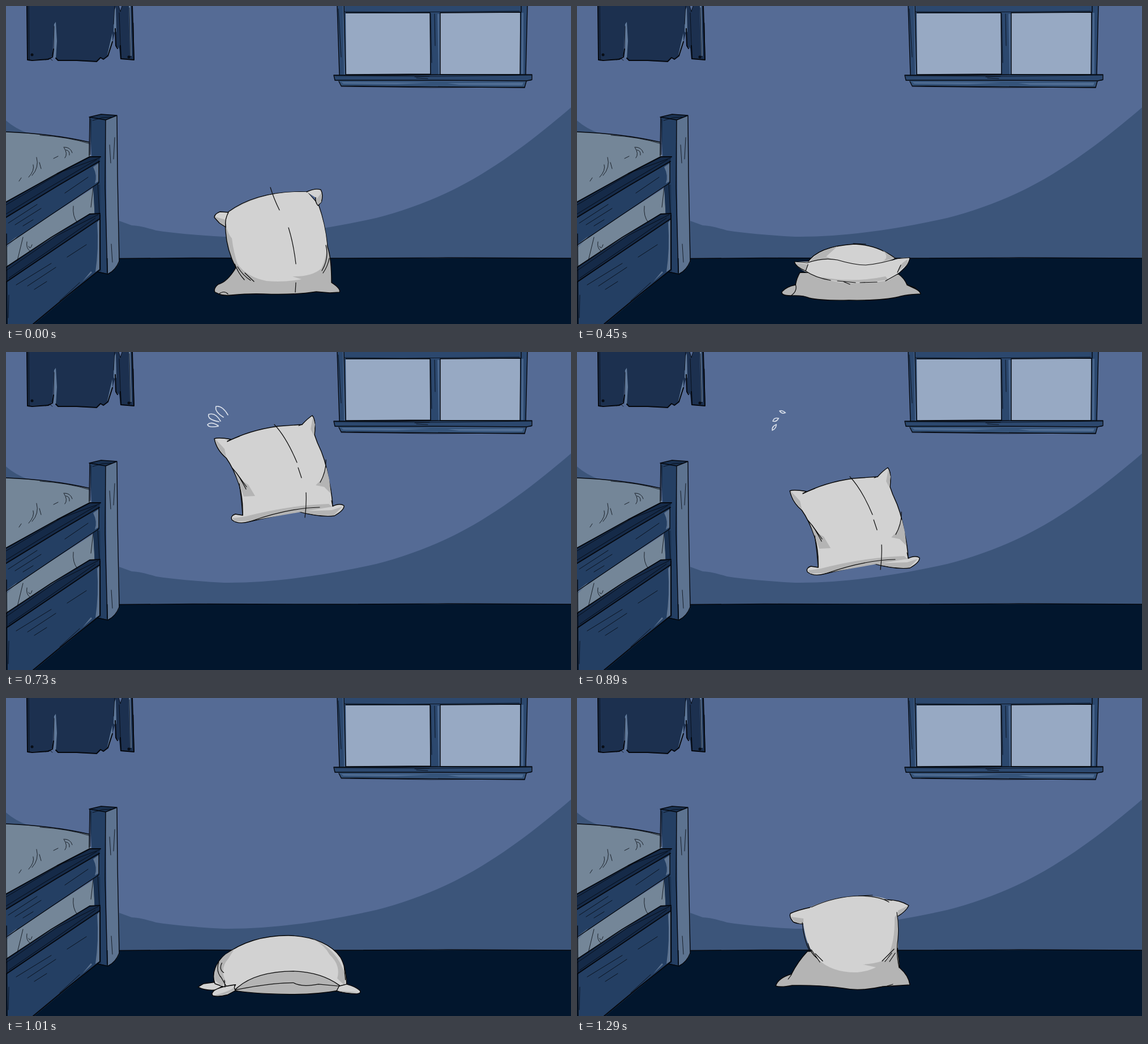
These frames come from a looping animation (998x561 px, 2.04 s). An HTML page:

```html
<!DOCTYPE html>
<html lang="en">
<head>
<meta charset="utf-8">
<title>Pillow hop</title>
<style>
html, body { margin: 0; width: 100%; height: 100%; overflow: hidden; background: #02162d; }
svg { display: block; width: 100%; height: 100%; }
.ink, .ink path { fill: none; stroke: #05080e; stroke-width: 1.4; stroke-linecap: round; stroke-linejoin: round; }
.ink .thin { stroke-width: .8; }
.ink .bold { stroke-width: 2; }
#pillow path { vector-effect: non-scaling-stroke; stroke-linecap: round; stroke-linejoin: round; }
.light { fill: #d2d2d2; }
.grey { fill: #b4b4b4; }
.edge { stroke: #080808; stroke-width: 1.4; }
.line { fill: none; stroke: #0c0c0c; stroke-width: 1.2; }
.flick { fill: none; stroke: #dde3ec; stroke-width: 1.6; stroke-linecap: round; }
</style>
</head>
<body>
<svg viewBox="0 0 998 561" preserveAspectRatio="none">
  <!-- wall and floor -->
  <path fill="#556b95" d="M0 0H998V446H0Z"/>
  <path fill="#3c557a" d="M998 179C940 229 870 283 800 319C750 345 690 366 640 377C560 394 470 408 385 407Q310 403 265 396Q235 387 222 387L200 379V446H998ZM0 202Q16 216 38 224H0Z"/>
  <path fill="#02162d" d="M0 445H998V561H0Z"/>
  <path class="ink" d="M200 445.500L330 444.500L600 445L780 444L998 445"/>

  <!-- torn poster -->
  <path fill="#1c304f" d="M37 0L38 95L75 94L82 88L85 32L89 60L88 93L92 96L160 98L167 91L172 94L180 88L188 63L193 45L194 70L200 75L202 94L226 95L223 0Z"/>
  <path fill="#60799a" d="M85 32L88 28L90 62L88 92L85 92ZM191 8L194 2L195 45L193 48L190 45ZM217 0L220 0L222 88L219 88ZM184 64L188 48L188 66L182 86L179 86Z"/>
  <path fill="#556b95" d="M199 0L202 9L205 0Z"/>
  <g class="ink">
    <path class="bold" d="M37 0L38 95L46 96L75 94L82 90L84 76M88 92L92 96L125 96L160 98L167 91L172 94L180 88L188 63M193 40L194 70L197 75M202 70L203 93L226 95L223 0"/>
    <path class="thin" d="M40 0L41 96M84 76L85 36M192 0L190 32M199 0L202 10L205 0M218 3L220 90M226 93L225 30M200 12L203 92M70 95L77 92L82 96"/>
  </g>
  <g fill="#080d16"><circle cx="46" cy="86" r="2.500"/><circle cx="217" cy="90" r="2.500"/></g>

  <!-- window -->
  <path fill="#2c486e" d="M585 0H921L918 122H589Z"/>
  <path fill="#48658c" d="M595 0H598L600 121H597ZM911 12L914 12L914 120L910 120ZM762 14H766V120H764Z"/>
  <path fill="#97a9c3" d="M600 13L749 12L749 121H601ZM767 12L908 12L908 121H767Z"/>
  <path fill="#2c486e" d="M580 122L929 121L928 132L581 132Z"/>
  <path fill="#355379" d="M588 132L919 133L916 144L592 141Z"/>
  <path fill="#506d93" d="M592 134L750 135L690 138L596 137ZM780 136L914 135L912 140L800 139Z"/>
  <g class="ink">
    <path d="M585 0L589 122M597 0L600 121M600 12L749 12M749 12L750 121M767 12L767 121M767 12L909 11L908 121M910 0V11M921 0L918 121M601 121L750 120M767 121L908 121"/>
    <path d="M579 122L690 122L770 121L929 121L929 130L920 132L760 131L581 131ZM588 133L592 141L700 142L916 144L919 133"/>
    <path class="thin" d="M750 13L752 100M598 10L700 11L907 9M722 125L748 124M725 127L745 128M587 5L592 90M757 14L758 70M581 123L760 124L928 122M592 142L750 144L916 143"/>
  </g>

  <!-- bed -->
  <path fill="#748698" d="M0 222Q80 226 146 240L150 268L0 348ZM0 420L156 320V370L0 464Z"/>
  <path fill="#243f63" d="M148 196L176 201L178 472L162 468L154 320Z"/>
  <path fill="#1a3150" d="M154 315H166L168 468H162ZM147 196L170 191L196 193L176 201Z"/>
  <path fill="#5d7390" d="M176 201L196 194L200 452Q194 466 180 472Z"/>
  <path fill="#152a48" d="M0 345L148 266H167L164 276L0 374ZM0 461L148 366H166V376L0 488Z"/>
  <path fill="#243f63" d="M0 372L164 274V312L0 422ZM2 487L166 374V465L50 561H2Z"/>
  <path fill="#5d7390" d="M164 277V309L157 313Q162 300 154 284ZM166 376V464L158 469Q164 430 161 382ZM152 470L135 486L150 468ZM0 421L20 406L2 426Z"/>
  <g class="ink">
    <path d="M0 222Q80 225 146 240M148 196L147 264M147 196L168 191L196 193L176 201ZM176 201L175 320L179 470M196 194L197 300L200 450Q194 466 180 473L161 469"/>
    <path class="bold" d="M0 346L90 296L148 266L167 266M0 373L90 318L165 274M0 461L80 408L148 367L166 366M0 487L80 433L166 375M166 368L166 465L112 508L48 561"/>
    <path d="M164 274V312M0 422L80 368L164 312M1 402L2 561"/>
    <path class="thin" d="M60 228Q110 231 148 243M153 202L170 197L186 196M0 351L100 292L165 268M0 367L70 324L160 271M0 467L90 405L163 368M5 480L75 432L158 374M154 320L150 355M162 312L165 366M150 200L149 262M183 245L185 277M192 232L190 270M186 420L188 452"/>
    <path class="thin" d="M40 302Q51 290 48 280M46 299Q59 285 54 267M59 276L62 287M23 309L27 303M84 269L92 265M103 249Q114 249 117 259M106 254Q113 255 112 263M102 249Q110 261 104 268M119 353Q117 371 126 382M20 449L30 408M37 416Q35 427 42 432M40 424Q43 431 46 421"/>
    <path class="thin" d="M4 383L55 350M16 386L62 357M30 388L48 377M104 330L145 302M18 492L80 454M38 494L88 461M50 500L72 486M108 443L142 421M5 510L4 550M130 488L95 520"/>
  </g>

  <g id="pillow"></g>
  <path id="flick" class="flick"/>
</svg>
<script>
// Each pose is a stack of [class, path]; later entries lie on top.
const G = "grey edge", L = "light edge", S = "light", D = "grey", I = "line";
const poses = {
  lean: [
    [G, "M406 462C398 475 388 488 375 491C366 498 367 506 372 506Q383 512 398 510Q430 507 455 508Q510 510 548 504L572 506L589 505Q592 499 575 488Q575 445 568 425Q564 385 552 350L532 328Q445 325 393 363Q386 376 388 398Q390 430 406 462Z"],
    [S, "M389 388Q386 376 393 364Q445 330 510 328H532L551 350Q564 385 567 420Q566 445 557 463Q540 478 506 477L522 482Q490 488 460 485Q425 478 409 455Q402 435 399 410Q392 402 389 388Z"],
    [G, "M393 364L378 363Q368 367 368 373L377 383L388 390Q386 376 393 364Z"],
    [S, "M391 365L378 364Q369 367 370 372L387 377Z"],
    [L, "M531 328Q545 321 556 324Q561 333 557 346L551 352Q546 346 547 338"],
    [D, "M557 330L557 346L551 351Q547 345 549 340Z"],
    [I, "M467 320Q473 340 483 360M499 391Q508 420 512 455M512 488L511 505M404 455Q410 471 421 483M409 460Q418 475 432 484M422 471L438 486M565 422Q571 445 558 467M571 445Q568 460 560 471M376 508Q385 501 392 508"]
  ],
  sag: [
    [G, "M407 462Q390 475 380 494Q358 499 357 509Q358 516 385 513Q440 512 500 514Q550 514 586 504Q600 508 616 506Q620 496 610 492L597 485Q585 465 570 450Z"],
    [S, "M388 394Q391 430 408 464L425 474L470 492L508 495L538 491L510 486L548 474L562 463Q573 440 572 410Q572 385 566 364L545 352Q480 345 430 357Q405 365 392 380Z"],
    [D, "M571 415Q570 450 556 466L530 480Q565 458 567 425ZM407 383Q470 381 536 365Q515 384 472 385Q440 386 407 383Z"],
    [L, "M398 373L387 366Q378 362 374 368Q373 380 380 389L389 397Q389 380 398 373Z"],
    [L, "M545 352Q556 338 565 335Q573 338 571 352Q569 364 564 368Q558 357 545 352Z"],
    [D, "M571 343L570 357L565 366L560 358ZM375 369Q384 378 388 394L380 388Z"],
    [I, "M398 373Q430 353 480 349Q515 347 545 352M388 394Q390 432 413 470M564 367Q571 385 572 410Q574 440 560 466M407 383Q470 388 500 380Q525 374 536 365M490 402Q498 430 499 462M502 498L501 513M432 473Q455 488 478 489M440 476Q470 490 504 493M470 478Q485 486 534 491M490 481Q500 484 531 485M374 362L384 364M590 483Q598 484 604 490"]
  ],
  flat: [
    [G, "M394 470Q388 480 386 492Q370 495 362 504Q360 511 378 511Q400 510 410 515Q430 520 480 519Q540 520 568 513Q580 509 607 508Q606 503 598 499L583 492Q578 480 568 473Z"],
    [L, "M407 453Q425 424 490 420Q530 421 562 445Q545 460 500 458Z"],
    [D, "M412 449Q427 432 460 424L440 442L452 447ZM540 431L561 445L535 452Q555 446 540 431Z"],
    [S, "M384 451Q390 465 410 471Q430 483 470 488Q520 490 550 484Q572 470 584 455L588 444Q575 443 560 448Q530 457 500 457Q450 440 412 451Z"],
    [D, "M386 453L407 456L403 467Q390 462 386 453ZM584 447L584 455L566 469Q568 456 584 447ZM430 478Q490 489 545 477L550 483Q490 492 440 482Z"],
    [I, "M403 467Q386 460 384 451L407 453Q435 443 460 448Q490 457 510 457Q540 454 562 446L588 444Q586 459 568 472L545 485M404 467L408 456M566 470L572 457M403 467Q420 479 448 484M470 486L482 491M460 485L492 488M500 488L530 487M488 419L510 420M386 491Q390 503 378 511M583 492L598 497"]
  ],
  air: [
    [L, "M391 158Q430 138 480 131L523 128Q533 117 541 112Q548 120 545 146L550 160Q565 190 570 225Q576 250 577 272Q590 266 597 271Q598 279 580 289Q555 292 515 281Q470 290 431 299Q410 305 399 296Q396 289 405 286L418 288Q419 260 412 235Q402 205 389 187Q372 173 368 153Q375 150 397 154Z"],
    [D, "M370 154L376 160L386 171L389 185Q373 172 370 154ZM542 115L546 128L543 146L538 136ZM404 212L413 225L428 234L440 254L420 255ZM566 203L571 225L574 250L562 238L547 235L558 224ZM419 291Q500 270 570 268L576 273Q520 282 431 298L404 299L400 293ZM516 281L575 279L594 273L579 288Q550 290 516 281Z"],
    [I, "M474 128Q495 150 514 195M516 204L522 222M530 248Q531 270 528 292M400 205Q412 218 424 242M407 213L425 238M418 288Q416 260 412 232M565 190Q566 210 555 230M431 299Q500 275 554 274M577 272L575 262M523 128L517 130M391 157L412 149"]
  ],
  fall: [
    [G, "M423 458Q400 478 390 490Q370 498 362 508Q370 516 405 510Q450 516 500 516Q560 514 585 510Q610 512 621 506Q612 496 592 490Q580 465 566 450Z"],
    [S, "M427 341Q450 328 500 325Q540 325 570 341Q575 360 575 385Q575 415 569 440Q562 465 545 480Q520 488 482 492Q460 486 440 468Q420 440 414 405Q409 370 414 347ZM482 492Q500 487 524 490Q520 499 495 498Z"],
    [L, "M411 373Q400 352 398 322Q404 321 416 329L427 341Q409 350 411 373Z"],
    [L, "M556 334Q568 316 585 310Q588 330 582 350L575 362Q574 347 570 341Z"],
    [D, "M400 333L410 349L409 367Q400 352 400 333ZM584 313Q587 330 581 349L575 358L573 342Z"],
    [I, "M427 341Q455 328 500 325Q535 324 570 341M411 365Q409 410 419 440Q422 453 432 468M575 355Q574 390 573 420Q570 445 556 465M414 395Q415 435 430 456M430 455Q432 473 442 482M438 461L452 484M456 473L472 490M544 482Q555 473 560 460M548 470L538 484M390 490L402 488M592 488L597 495M478 327L488 322"]
  ],
  dome: [
    [L, "M379 497L362 500L353 507Q365 515 382 513L398 500Z"],
    [L, "M380 500C374 478 382 456 395 441C424 412 460 400 497 400C540 401 568 422 580 445Q589 465 590 502L578 515L412 515Z"],
    [D, "M536 407Q575 428 587 480V504L575 489Q581 462 563 440Q555 420 536 407ZM380 492Q377 462 397 439L411 428L402 447Q386 470 398 497L390 505Z"],
    [G, "M411 514Q440 475 505 474Q550 476 579 504L583 513Q540 523 500 522Q440 521 411 514Z"],
    [L, "M413 502Q388 506 379 514Q373 521 377 525Q386 528 400 523L413 514Q409 508 413 502Z"],
    [L, "M590 501Q604 506 611 514Q614 520 606 521Q590 521 574 515L578 505Z"],
    [D, "M379 524Q399 518 411 508L410 514Q392 527 379 524ZM583 515L609 518Q592 521 576 515Z"],
    [I, "M412 513Q470 498 505 498Q518 508 545 501L578 505M386 455Q381 475 391 489M391 457Q386 470 394 477M389 485L398 505M395 493L396 507M586 465L588 492"]
  ],
  rest: [
    [G, "M407 447Q390 465 379 487Q355 494 351 508Q360 511 380 507Q430 506 470 512Q500 518 540 509L588 506Q586 490 570 476L566 440Z"],
    [L, "M414 369Q390 374 377 380Q374 386 382 395Q390 399 402 398Z"],
    [L, "M548 356Q570 356 586 366Q582 376 565 386Z"],
    [D, "M378 386L400 389V398Q384 399 378 386ZM584 367Q580 376 567 384L567 375Z"],
    [S, "M400 400Q398 382 414 368Q455 350 500 349Q540 349 554 359Q568 375 567 400Q568 430 561 452Q542 468 505 470L528 475Q515 482 495 484Q450 485 425 460Q405 440 400 400Z"],
    [D, "M561 387L566 380L567 440L558 456L548 459Q562 430 561 387Z"],
    [I, "M414 369Q455 350 500 349Q535 350 551 360M398 396Q400 425 411 447M565 378Q569 400 567 425Q563 448 569 476M408 433Q412 450 425 460M414 444L429 466M421 451L434 464M560 443L539 464M556 450L544 465M562 450L552 465M497 349L522 348M540 355L556 357M548 508L558 505M379 488L373 496"]
  ]
};

const bigFlick = "M392 111Q382 94 371 96Q368 105 384 115M379 122Q370 106 358 110Q355 119 376 123M375 130Q362 122 356 128Q357 134 375 131";
const smallFlick = "M358 104Q362 102 368 107Q362 110 358 104ZM346 122Q348 115 356 117Q352 124 346 122ZM345 138Q344 131 352 128Q352 135 345 138Z";

// start time, pose, transform, flick marks
const steps = [
  [0, "lean"],
  [290, "sag"],
  [370, "sag", "translate(0 129) scale(1 .75)"],
  [450, "flat"],
  [570, "air", "translate(0 50)"],
  [730, "air", "", bigFlick],
  [890, "air", "translate(8 92)", smallFlick],
  [970, "fall", "", smallFlick],
  [1010, "dome", "translate(-52 79) scale(1.108 .85)"],
  [1130, "dome"],
  [1210, "rest", "translate(19 -51) scale(.96 1.1)"],
  [1290, "rest"]
];
const LOOP = 2040;
const pillow = document.getElementById("pillow");
const flick = document.getElementById("flick");
let shown;

function draw(ms) {
  const step = steps.findLast(s => s[0] <= ms);
  if (step === shown) return;
  shown = step;
  const [, pose, move = "", marks = ""] = step;
  pillow.innerHTML = poses[pose].map(([c, d]) => `<path class="${c}" d="${d}"/>`).join("");
  pillow.setAttribute("transform", move);
  flick.setAttribute("d", marks);
}

const start = performance.now();
function tick() {
  draw((performance.now() - start) % LOOP);
  requestAnimationFrame(tick);
}
tick();
</script>
</body>
</html>
```
